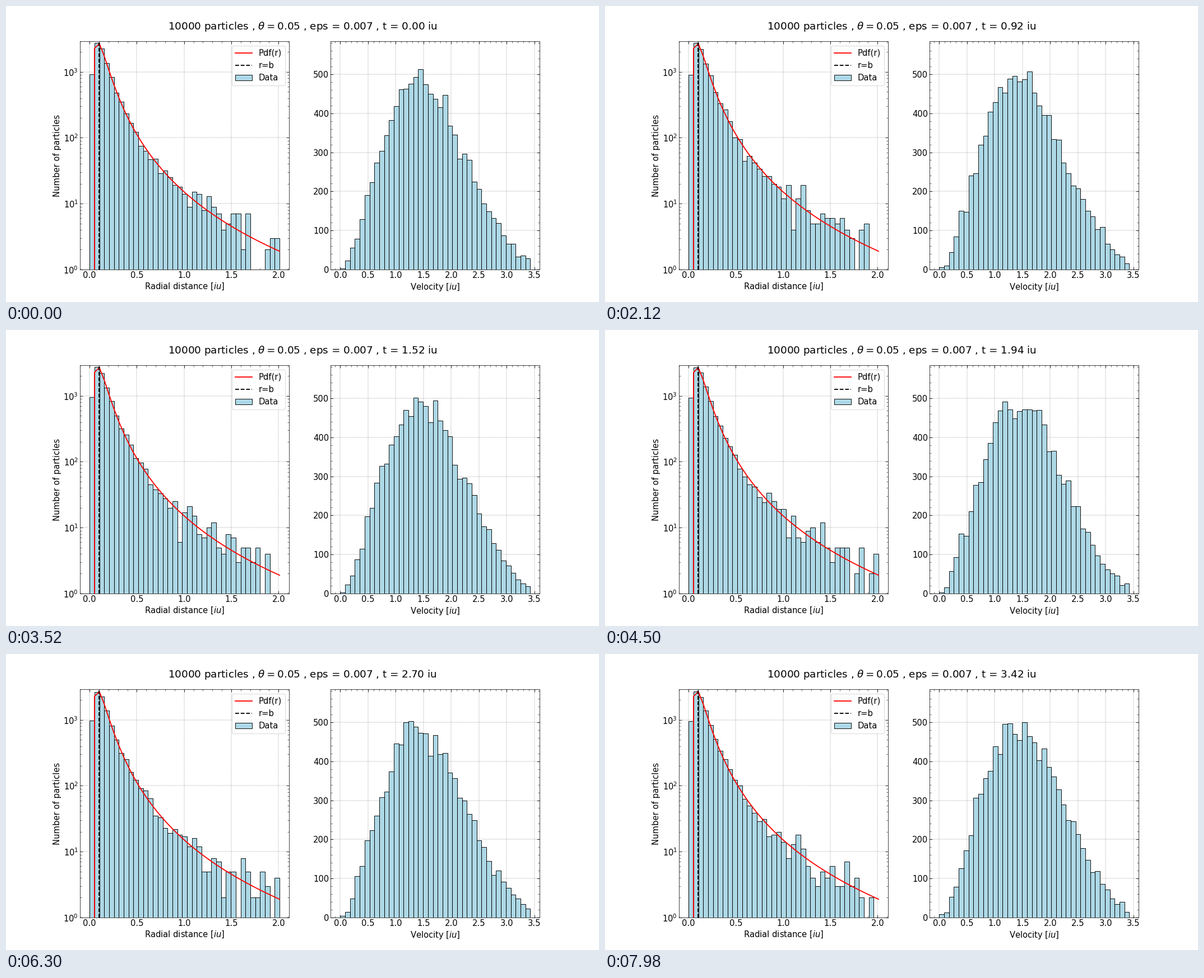
A matplotlib script for the animation above (8000 ms loop, 1058 px wide and 529 px high).

```python
import matplotlib.pyplot as plt
import numpy as np
from matplotlib.animation import FuncAnimation
from matplotlib.lines import TICKDOWN, TICKLEFT, TICKRIGHT, TICKUP
from matplotlib.patches import Patch, PathPatch
from matplotlib.path import Path

N = 10000
B = 0.1                    # Plummer scale length
R_MAX, V_MAX = 2.01, 3.422
BINS = 39
DT, SUBSTEPS = 0.02, 5
TICK_MS, LOOP_MS = 20, 8000
STATES = 172

# Initial histogram counts; the remaining particles lie beyond the last edge.
R_START = [925, 2740, 2275, 1355, 839, 485, 351, 232, 168, 123, 75, 63, 47,
           48, 29, 32, 25, 19, 18, 14, 9, 15, 14, 8, 13, 9, 7, 4, 5, 7, 7, 2,
           7, 0, 0, 0, 2, 3, 3]
V_START = [3, 22, 56, 78, 129, 191, 223, 273, 303, 344, 383, 418, 461, 463,
           476, 493, 513, 474, 450, 437, 416, 447, 368, 345, 284, 297, 281,
           225, 206, 169, 149, 131, 118, 87, 65, 66, 33, 35, 29]

r_edges = np.linspace(0, R_MAX, BINS + 1)
v_edges = np.linspace(0, V_MAX, BINS + 1)
rng = np.random.default_rng(7)


def draw_from_bins(edges, last, counts):
    """Uniform samples in each bin, with the leftover particles up to `last`."""
    bounds = np.append(edges, last)
    counts = np.append(counts, N - sum(counts))
    return rng.uniform(np.repeat(bounds[:-1], counts),
                       np.repeat(bounds[1:], counts))


def directions():
    vec = rng.normal(size=(N, 3))
    return vec / np.linalg.norm(vec, axis=1, keepdims=True)


def initial_state():
    mass = r_edges**3 / (r_edges**2 + B**2) ** 1.5
    u = draw_from_bins(mass, 1, R_START)
    r = B / np.sqrt(u ** (-2 / 3) - 1)

    q = np.linspace(0, 1, 1000)
    cdf = np.cumsum(q**2 * (1 - q**2) ** 3.5)
    speed = np.interp(rng.random(N), cdf / cdf[-1], q)
    speed *= np.sqrt(2) * (r**2 + B**2) ** -0.25
    # Keep each particle's rank while matching the starting speed histogram.
    speed[np.argsort(speed)] = np.sort(draw_from_bins(v_edges, 3.9, V_START))
    return r[:, None] * directions(), speed[:, None] * directions()


def acceleration(pos):
    r2 = np.einsum("ij,ij->i", pos, pos)
    return -pos * ((r2 + B**2) ** -1.5)[:, None]


def simulate():
    """Leapfrog orbits in the Plummer potential, binned at every state."""
    pos, vel = initial_state()
    h = DT / SUBSTEPS
    radial, speeds = [], []
    for _ in range(STATES):
        radial.append(np.histogram(np.linalg.norm(pos, axis=1), r_edges)[0])
        speeds.append(np.histogram(np.linalg.norm(vel, axis=1), v_edges)[0])
        acc = acceleration(pos)
        for _ in range(SUBSTEPS):
            vel = vel + acc * h / 2
            pos = pos + vel * h
            acc = acceleration(pos)
            vel = vel + acc * h / 2
    return radial, speeds


def bar_path(edges, heights, base):
    """All bars of a histogram as one compound path."""
    left, right = edges[:-1], edges[1:]
    top = np.maximum(heights, base)
    low = np.full(BINS, base)
    x = np.stack([left, left, right, right, left], axis=1)
    y = np.stack([low, top, top, low, low], axis=1)
    codes = [Path.MOVETO] + [Path.LINETO] * 3 + [Path.CLOSEPOLY]
    return Path(np.stack([x.ravel(), y.ravel()], axis=1), codes * BINS)


def minor_ticks(ax, xs, ys):
    style = dict(ls="", color="k", ms=3, mew=0.6, zorder=0.5)
    for side, up, across in ((0, TICKUP, TICKRIGHT), (1, TICKDOWN, TICKLEFT)):
        ax.plot(xs, np.full(len(xs), side), marker=up,
                transform=ax.get_xaxis_transform(), **style)
        ax.plot(np.full(len(ys), side), ys, marker=across,
                transform=ax.get_yaxis_transform(), **style)


def style_axes(ax, x_max, x_ticks, y_lim, label):
    ax.set_axisbelow(True)
    ax.set_xticks(x_ticks)
    ax.set_xlim(-0.05 * x_max, 1.05 * x_max)
    ax.set_ylim(*y_lim)
    ax.minorticks_off()
    ax.tick_params(direction="in", top=True, right=True, length=5)
    ax.grid(color="gray", ls="--", lw=0.5)
    ax.set_xlabel(label)


plt.rcParams.update({"font.family": "DejaVu Sans", "font.size": 16})
fig, (ax_r, ax_v) = plt.subplots(1, 2, figsize=(16, 8), dpi=66.125)
title = fig.suptitle("", fontsize=20, y=0.95)

ax_r.set_yscale("log", nonpositive="clip")
log_minor = [m * 10**k for k in range(4) for m in range(2, 10)
             if m * 10**k < 2890]
minor_ticks(ax_r, np.arange(-1, 22) / 10, log_minor)
minor_ticks(ax_v, np.arange(-1, 36) / 10, np.arange(0, 581, 20))

bar_style = dict(facecolor="lightblue", edgecolor="black", lw=1)
radial, speeds = simulate()
r_bars = ax_r.add_patch(PathPatch(bar_path(r_edges, radial[0], 0.1),
                                  snap=True, **bar_style))
v_bars = ax_v.add_patch(PathPatch(bar_path(v_edges, speeds[0], 0),
                                  snap=True, **bar_style))

pdf = 3 * r_edges**2 / B**3 * (1 + (r_edges / B) ** 2) ** -2.5
curve, = ax_r.plot(r_edges, N * r_edges[1] * pdf, color="red", lw=2,
                   label="Pdf(r)")
scale = ax_r.axvline(B, color="black", ls="--", lw=2, label="r=b")

style_axes(ax_r, R_MAX, np.arange(0, 2.1, 0.5), (1, 10**3.462),
           "Radial distance [$iu$]")
style_axes(ax_v, V_MAX, np.arange(0, 3.6, 0.5), (0, 583.9),
           "Velocity [$iu$]")
ax_r.set_ylabel("Number of particles")
ax_v.set_yticks(np.arange(0, 501, 100))
ax_r.legend(handles=[curve, scale, Patch(label="Data", **bar_style)],
            loc="upper right")


def state_at(tick):
    """States last 1, 5 and 1 ticks in turn."""
    cycle, part = divmod(tick, 7)
    return 3 * cycle + (part > 0) + (part > 5)


def update(tick):
    k = state_at(tick)
    r_bars.set_path(bar_path(r_edges, radial[k], 0.1))
    v_bars.set_path(bar_path(v_edges, speeds[k], 0))
    title.set_text(rf"{N} particles , $\theta = 0.05$ , eps = 0.007 , "
                   f"t = {k * DT:.2f} iu")
    return r_bars, v_bars, title


anim = FuncAnimation(fig, update, frames=LOOP_MS // TICK_MS,
                     interval=TICK_MS, repeat=True, cache_frame_data=False)
plt.show()
```
